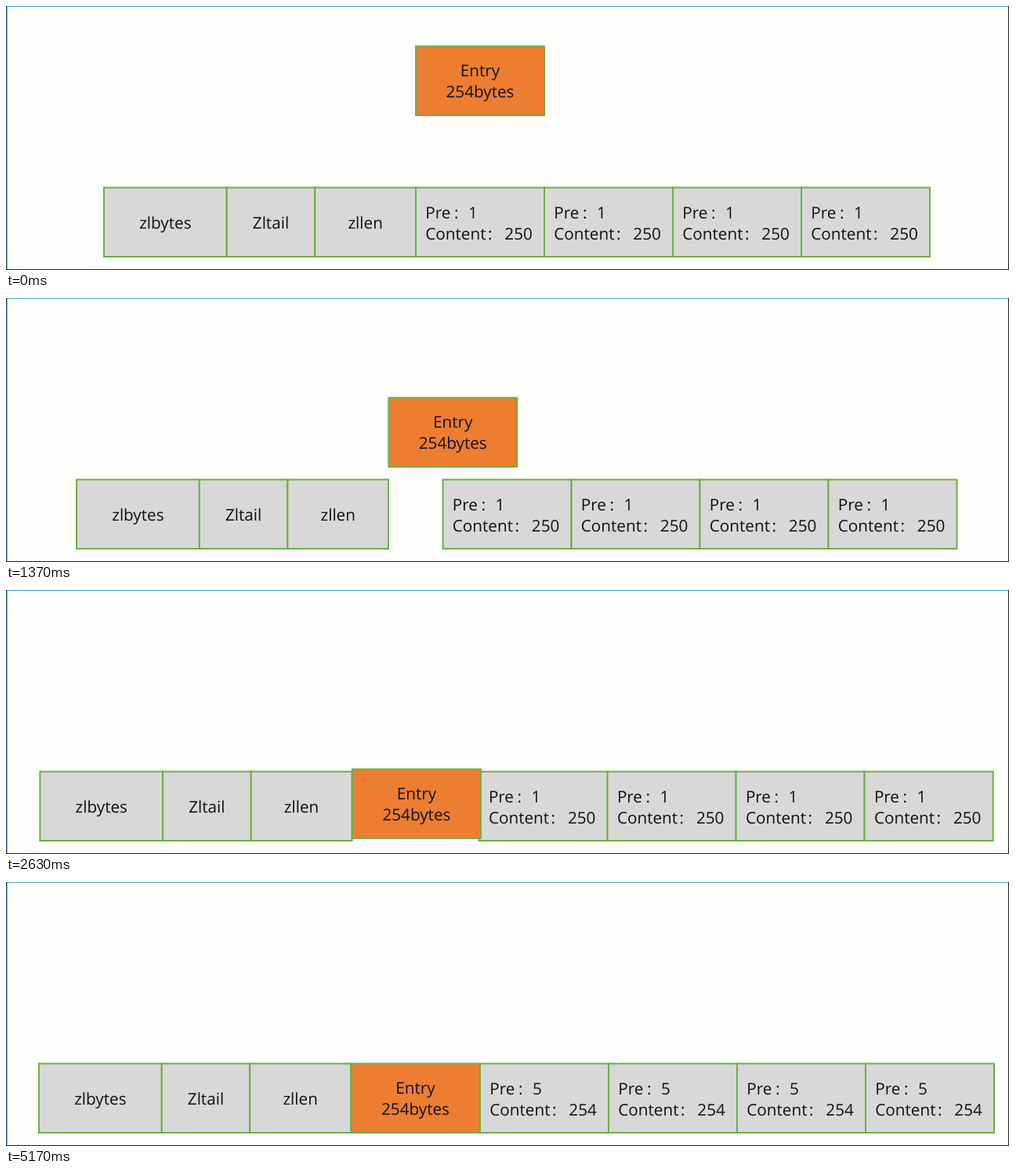
Animation, 1280 px wide and 338 px high, one loop 5210 ms. Source, as an HTML page:

```html
<!DOCTYPE html>
<html lang="en">
<head>
<meta charset="utf-8">
<title>Inserting an entry</title>
<style>
  html, body { margin: 0; width: 100%; height: 100%; overflow: hidden; background: #fdfdfc; }
  svg { display: block; width: 1280px; height: 338px; }
  text { font: 20.7px "Open Sans", "Noto Sans", sans-serif; fill: #111; text-rendering: geometricPrecision; }
  .box { stroke: #70ad47; stroke-width: 2; }
  .mid { text-anchor: middle; }
</style>
</head>
<body>
<svg viewBox="0 0 1280 338">
  <g id="head"></g>
  <g id="tail"></g>
  <g id="entry"></g>
  <path d="M0 .5H1280" stroke="#3d9fd3"/>
  <path d="M.75 0V338" stroke="#1f4e79" stroke-width="1.5"/>
  <path d="M0 337.5H1280M1279.5 0V338" stroke="#16202c"/>
</svg>
<script>
const LOOP = 5210, FADE_DELAY = 2800;
const [head, tail, entry] = ["head", "tail", "entry"].map(id => document.getElementById(id));

function add(parent, tag, attrs, content = "") {
  const el = document.createElementNS("http://www.w3.org/2000/svg", tag);
  for (const k in attrs) el.setAttribute(k, attrs[k]);
  el.textContent = content;
  parent.append(el);
  return el;
}
const box = (g, x, y, width, fill) =>
  add(g, "rect", { class: "box", x, y, width, height: 88.5, fill });
const label = (g, x, y, content, cls = "") =>
  add(g, "text", { x, y, class: cls }, content);

const GREY = "#d8d8d8", before = [], after = [];

for (const [x, w, name] of [[125, 156.7, "zlbytes"], [281.7, 112.6, "Zltail"], [394.3, 128.7, "zllen"]]) {
  box(head, x, 232.5, w, GREY);
  label(head, x + w / 2, 285, name, "mid");
}

for (let i = 0; i < 4; i++) {
  const x = 523 + i * 164, top = 271.5, low = 298.5;
  box(tail, x, 232.5, 164, GREY);
  label(tail, x + 12.3, top, "Pre");
  label(tail, x + 49, top, ":");
  label(tail, x + 12.3, low, "Content");
  label(tail, x + 92, low, ":");
  label(tail, x + 113.3, low, "25");
  before.push(label(tail, x + 67, top, "1"), label(tail, x + 137, low, "0"));
  after.push(label(tail, x + 67, top, "5"), label(tail, x + 137, low, "4"));
}

box(entry, 523, 51.5, 164, "#ed7d31");
label(entry, 605, 90.3, "Entry", "mid");
label(entry, 605, 117.3, "254bytes", "mid");

// Quick start, long settling end: [ms, progress]
const KEYS = [[785, 0], [870, .011], [1070, .13], [1370, .42], [1600, .635],
              [1830, .78], [2230, .94], [2670, .985], [3200, 1]];

function slope(i) {
  if (i === 0 || i === KEYS.length - 1) return 0;
  const a = KEYS[i - 1], b = KEYS[i + 1];
  return (b[1] - a[1]) / (b[0] - a[0]);
}

function progress(t) {
  const i = KEYS.findIndex(k => k[0] > t);
  if (i === 0) return 0;
  if (i < 0) return 1;
  const [t0, p0] = KEYS[i - 1], [t1, p1] = KEYS[i], d = t1 - t0, u = (t - t0) / d;
  const s = u * u * (3 - 2 * u);
  return p0 + (p1 - p0) * s + d * u * (1 - u) * ((1 - u) * slope(i - 1) - u * slope(i));
}

const move = (g, x, y = 0) => g.setAttribute("transform", `translate(${x} ${y})`);

function draw(now) {
  const t = now % LOOP, p = progress(t), fade = progress(t - FADE_DELAY);
  move(head, -83 * p);
  move(tail, 82 * p);
  move(entry, -82.5 * p, 181 * p);
  before.forEach(el => el.setAttribute("opacity", 1 - fade));
  after.forEach(el => el.setAttribute("opacity", fade));
}

const start = performance.now();
function tick() {
  draw(performance.now() - start);
  requestAnimationFrame(tick);
}
tick();
</script>
</body>
</html>
```
